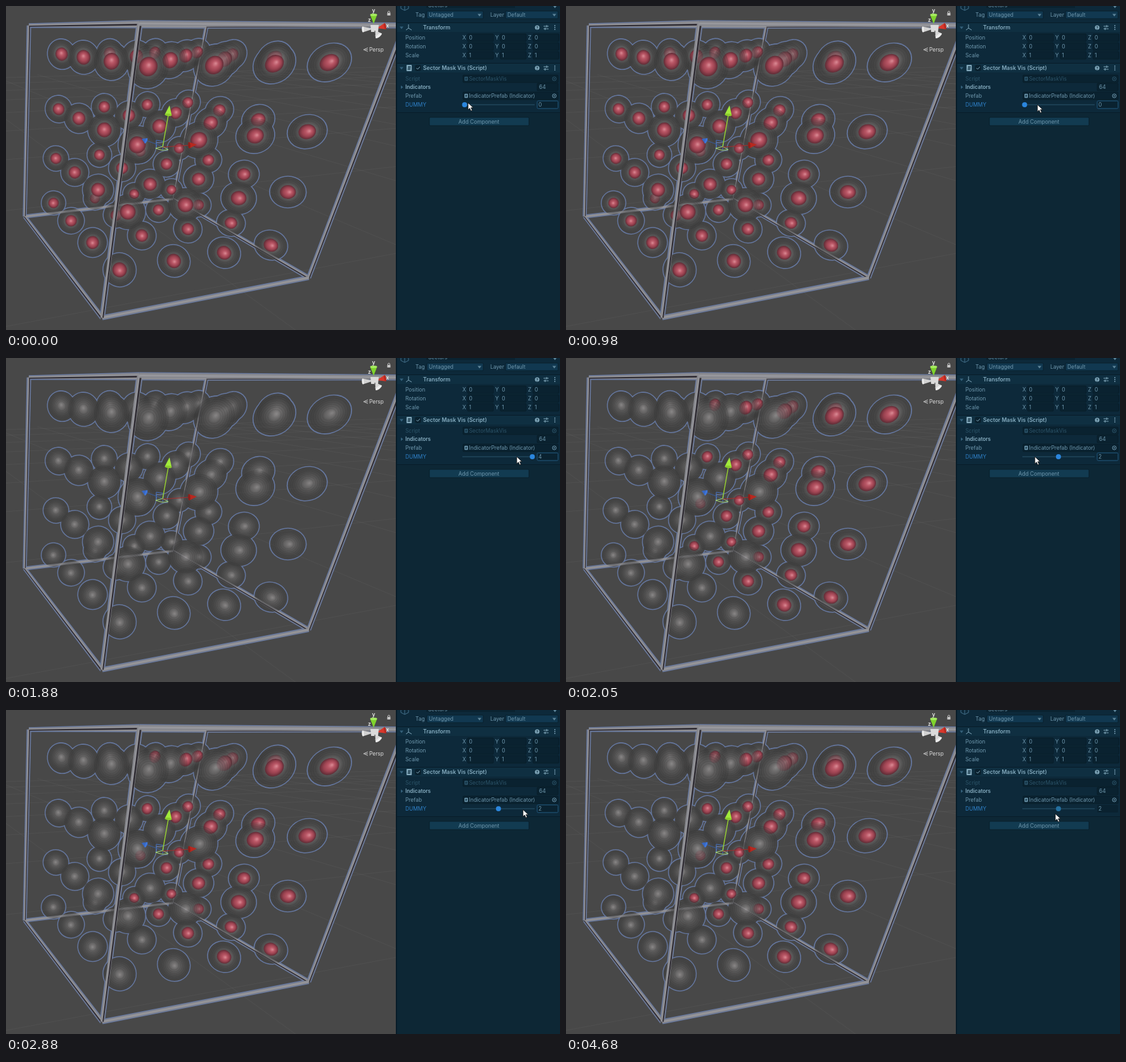
These frames come from a looping animation (874x512 px, 4700 ms). An HTML page with a canvas:

```html
<!DOCTYPE html>
<html lang="en">
<head>
<meta charset="utf-8">
<title>Sector mask</title>
<style>
html, body { margin: 0; width: 100%; height: 100%; overflow: hidden; background: #484848; }
canvas, svg { position: absolute; left: 0; top: 0; display: block; }
text { font: 8.4px Inter, sans-serif; fill: #6f98ae; dominant-baseline: central; }
.bold { font-weight: 600; font-size: 8.6px; fill: #86adc0; }
.dim { fill: #2c5469; }
.blue { fill: #2f80c8; }
.white { fill: #dedede; }
.axis { fill: #e8e8e8; font-weight: 600; }
</style>
</head>
<body>
<canvas id="scene" width="616" height="512"></canvas>
<svg id="ui" width="874" height="512" viewBox="0 0 874 512"></svg>
<script>
const LOOP = 4700;
const scene = document.getElementById('scene');
const ctx = scene.getContext('2d');
const ui = document.getElementById('ui');

// Perspective: grid coordinates (right, down, near) to pixels and depth.
function project(x, y, z) {
  const d = 1 + 0.033 * x + 0.057 * y - 0.108 * z;
  return {
    x: (87.8 + 81.2 * x + 21.33 * z) / d,
    y: (76.1 + 1.47 * x + 96.13 * y - 3.8 * z) / d,
    d
  };
}

// Spheres stretch away from the view axis, and their lit spot moves with them.
const balls = [];
for (let i = 0; i < 64; i++) {
  const col = i >> 4, p = project(col, i >> 2 & 3, i & 3);
  const dx = p.x - 150, dy = p.y - 290, slope = Math.hypot(dx, dy) / 515;
  const stretch = Math.hypot(1, slope);
  balls.push({ ...p, col, r: 21.6 / p.d, angle: Math.atan2(dy, dx), stretch,
    lit: 0.5 * slope / stretch });
}
const farFirst = (a, b) => b.d - a.d;
balls.sort(farFirst);

function disc(c, ball, r, fill) {
  c.save();
  c.translate(ball.x, ball.y);
  c.rotate(ball.angle);
  c.scale(ball.stretch, 1);
  c.beginPath();
  c.arc(0, 0, r, 0, 7);
  c.fillStyle = fill;
  c.fill();
  c.restore();
}

function shade(ball, r, ...colors) {
  const g = ctx.createRadialGradient(r * ball.lit, 0, 0, 0, 0, r);
  colors.forEach((color, i) => g.addColorStop(i / (colors.length - 1), color));
  return g;
}

function drawBall(ball, on) {
  const inner = on ? 0.6 : 0.25;
  for (let k = 1; k > inner; k -= 0.11) {
    const r = ball.r * k;
    disc(ctx, ball, r, shade(ball, r, 'rgba(158,155,155,.19)', 'rgba(122,120,120,.19)',
      'rgba(98,97,97,.19)', 'rgba(42,42,42,.24)'));
  }
  const core = ball.r * 0.45;
  if (on) disc(ctx, ball, core, shade(ball, core, '#da8a94', '#b95766', '#9a4250', '#5f2c36'));
}

// Cube frame: each bar joins two corners that differ along one axis.
const LOW = [-0.5, -0.48, -0.5], HIGH = [3.5, 3.47, 3.5];
const corner = n => project(...LOW.map((low, i) => n >> i & 1 ? HIGH[i] : low));
const bars = [];
for (let n = 0; n < 8; n++)
  for (let axis = 0; axis < 3; axis++)
    if (!(n >> axis & 1)) {
      const a = corner(n), b = corner(n | 1 << axis);
      bars.push({ a, b, axis, d: (a.d + b.d) / 2 });
    }
bars.sort(farFirst);

function band(c, { a, b }, lo, hi, fill, grow = 0) {
  const len = Math.hypot(b.x - a.x, b.y - a.y);
  const nx = (a.y - b.y) / len, ny = (b.x - a.x) / len;
  const at = (p, k) => {
    const off = k / p.d + Math.sign(k) * grow;
    return [p.x + nx * off, p.y + ny * off];
  };
  polygon(c, [at(a, lo), at(a, hi), at(b, hi), at(b, lo)], fill);
}

function drawBar(bar) {
  band(ctx, bar, -2.3, 2.3, '#87888e');
  band(ctx, bar, -0.8, 0.8, '#98989d');
  const side = [0, -1, 1][bar.axis];
  if (side) band(ctx, bar, side * 0.3, side * 1.9, '#302d34');
}

function polygon(c, points, fill) {
  c.beginPath();
  points.forEach(p => c.lineTo(...p));
  c.closePath();
  c.fillStyle = fill;
  c.fill();
}

function stroke(points, color, width = 1) {
  ctx.beginPath();
  points.forEach(p => ctx.lineTo(...p));
  ctx.strokeStyle = color;
  ctx.lineWidth = width;
  ctx.stroke();
}

function cone(tx, ty, bx, by, w, color, cap = color) {
  const angle = Math.atan2(by - ty, bx - tx);
  const nx = -Math.sin(angle) * w, ny = Math.cos(angle) * w;
  polygon(ctx, [[tx, ty], [bx + nx, by + ny], [bx - nx, by - ny]], color);
  ctx.beginPath();
  ctx.ellipse(bx, by, w * 0.35, w, angle, 0, 7);
  ctx.fillStyle = cap;
  ctx.fill();
}

function floorLine(from, to) {
  const near = 0.12;
  const a = project(...from);
  let b = project(...to);
  if (a.d < near) return;
  if (b.d < near) {
    const t = (a.d - near) / (a.d - b.d);
    b = project(...from.map((v, i) => v + (to[i] - v) * t));
  }
  stroke([[a.x, a.y], [b.x, b.y]], 'rgba(150,150,150,.13)', 0.8);
}

// Selection outline around the union of bars and spheres.
const rim = document.createElement('canvas');
rim.width = scene.width;
rim.height = scene.height;
{
  const c = rim.getContext('2d'), color = '#65779f';
  bars.forEach(bar => band(c, bar, -2.3, 2.3, color, 1.3));
  balls.forEach(ball => disc(c, ball, ball.r + 1.5, color));
  c.globalCompositeOperation = 'destination-out';
  balls.forEach(ball => disc(c, ball, ball.r, '#000'));
}

function drawHandles() {
  stroke([[237, 225], [237, 212], [249, 214], [247, 228]], '#4470bd');
  stroke([[247, 228], [236, 225], [247, 222], [256, 227], [247, 228]], '#a3d776');
  stroke([[220, 212], [247, 222]], '#345a9c');
  stroke([[247, 223], [256, 173]], '#9ad62f', 1.4);
  stroke([[247, 223], [290, 220]], '#a52c2b', 1.2);
  cone(258, 157, 256, 172, 5.5, '#a2ea3c', '#8acb2c');
  cone(301, 219, 289, 220, 5, '#b8281f', '#8d1f1a');
  cone(214, 210, 221, 213, 4.5, '#3768c4', '#3f77dc');
}

function drawCompass() {
  cone(580, 28, 580, 14, 5.5, '#7fd32d', '#a7ec62');
  cone(585, 35, 598, 32, 5, '#d8372b', '#b82a22');
  cone(580, 36, 563, 37, 4.5, '#d2d2d2', '#eee');
  cone(581, 38, 588, 47, 6, '#d6d6d6', '#eee');
  polygon(ctx, [[575, 30], [588, 30], [587, 41], [576, 41]], '#dadada');
  stroke([[582, 39], [582, 46]], '#333');
}

function drawScene(value) {
  ctx.fillStyle = '#484848';
  ctx.fillRect(0, 0, scene.width, scene.height);
  for (let k = -6; k <= 8; k++) {
    const at = 1.5 + 2.1 * k;
    floorLine([45, 1.5, at], [-16, 1.5, at]);
    floorLine([at, 1.5, -12], [at, 1.5, 14]);
  }
  ctx.drawImage(rim, 0, 0);
  const isBack = bar => bar.d > 1.05;
  bars.filter(isBack).forEach(drawBar);
  balls.forEach(ball => drawBall(ball, ball.col >= value));
  bars.filter(bar => !isBack(bar)).forEach(drawBar);
  drawHandles();
  drawCompass();
}

// Inspector panel
const INK = '#7fa5b8', FIELD = '#0a2230', LINE = '#081c28', HEAD = '#0f2f41';
let svg = '';
const add = s => { svg += s; };
const box = (x, y, w, h, fill, extra = '') =>
  add(`<rect x="${x}" y="${y}" width="${w}" height="${h}" fill="${fill}" ${extra}/>`);
const path = (d, color, fill = 'none') =>
  add(`<path d="${d}" stroke="${color}" fill="${fill}"/>`);
const circle = (x, y, r, fill, extra = '') =>
  add(`<circle cx="${x}" cy="${y}" r="${r}" fill="${fill}" ${extra}/>`);
const label = (x, y, s, cls = '', extra = '') =>
  add(`<text x="${x}" y="${y}" class="${cls}" ${extra}>${s}</text>`);
const glyph = (x, y, s, size, fill) =>
  label(x, y, s, '', `text-anchor="middle" style="font-size:${size}px;font-weight:700;fill:${fill}"`);
const field = (x, y, w, fill = FIELD) =>
  box(x, y - 6, w, 12, fill, `rx="1.5" stroke="${LINE}" stroke-width=".8"`);
const arrow = (x, y, color = '#5d8499') => path(`M${x - 3} ${y - 1.5}h6l-3 4z`, 'none', color);

function dropdown(x, y, w, s) {
  field(x, y, w, '#113850');
  label(x + 3, y, s);
  arrow(x + w - 6, y);
}

function script(x, y, h, color) {
  box(x - h / 2.4, y - h / 2, h / 1.2, h, color, 'rx="1"');
  glyph(x, y + 0.3, '#', h * 0.8, HEAD);
}

function objectField(y, s, cls, color) {
  field(721, y, 150);
  script(726, y, 6.5, color);
  label(730.5, y, s, cls);
  circle(865, y, 3, 'none', `stroke="${color}"`);
  circle(865, y, 1.1, color);
}

function header(y, title) {
  box(617, y - 8, 257, 15, HEAD);
  box(617, y - 8, 257, 1, LINE);
  arrow(624, y, '#35607a');
  label(658, y, title, 'bold');
  circle(838, y, 3.6, INK);
  glyph(838, y + 0.2, '?', 6, HEAD);
  path(`M848 ${y - 2}h8M848 ${y + 2}h8M853 ${y - 4}v4M850.5 ${y}v4`, INK);
  for (const k of [-3, 0, 3]) box(865, y + k - 0.8, 1.6, 1.6, INK);
}

box(616, 0, 258, 512, '#0d2735');
box(617, 0, 257, 168, '#0d293a');
box(615, 0, 2, 512, LINE);
path('M623 0v4l6 3l6 -3v-4M629 7v-7', '#44708a');
box(663, -6, 140, 9, FIELD);
label(666, -1, 'Sectors');
arrow(866, 1);
label(646, 14, 'Tag');
dropdown(664, 14, 89, 'Untagged');
label(764, 14, 'Layer');
dropdown(788, 14, 83, 'Default');

header(34, 'Transform');
path('M635 29v6l-4 3M635 35l5 3', INK);
['Position', 'Rotation', 'Scale'].forEach((name, row) => {
  const y = 50 + 14 * row;
  label(630, y, name);
  ['X', 'Y', 'Z'].forEach((axis, i) => {
    const x = 728 + 51.7 * i;
    label(x - 8, y, axis);
    field(x, y, 41);
    label(x + 2.5, y, row === 2 ? 1 : 0);
  });
});

header(98, 'Sector Mask Vis (Script)');
script(636, 98, 10, INK);
box(646, 94, 8, 8, FIELD, `rx="1" stroke="${LINE}"`);
path('M647.5 98l2 2l3.5 -4', INK);
label(630, 115, 'Script', 'dim');
objectField(115, 'SectorMaskVis', 'dim', '#2c5469');
path('M623 125.5l3.5 2.8l-3.5 2.8z', 'none', '#35607a');
label(630, 128, 'Indicators', 'bold', 'style="font-size:8.3px"');
field(838, 128, 33);
label(841, 128, '64');
label(630, 142, 'Prefab');
objectField(142, 'IndicatorPrefab (Indicator)', '', '#6f98ae');
label(630, 156, 'DUMMY', 'blue');
box(720, 155.5, 114, 1, '#2b556c');
circle(0, 156, 4, 'none', 'id="knob"');
box(838, 150, 33, 12, FIELD, 'id="entry" rx="1.5"');
label(840, 156, '0', '', 'id="value"');
box(617, 168, 257, 1, LINE);
box(668, 176, 157, 13, '#123b51', `rx="1.5" stroke="${LINE}" stroke-width=".8"`);
label(746, 182.5, 'Add Component', '', 'text-anchor="middle"');

label(577.5, 7, 'y', 'axis');
label(571, 22, 'z', 'axis');
label(599.5, 31, 'x', 'axis');
label(573, 69, 'Persp', 'white');
path('M571 66l-7 3l7 3M566 69h5', '#bdbdbd');
box(601.5, 11, 5, 4, '#c5c5c5');
path('M602.5 11v-2q1.5 -2 3 0v2', '#c5c5c5');
add('<path id="cursor" d="M0 0v11l2.6 -2.4l1.9 4.2l2 -.9l-1.9 -4.1h3.6z" fill="#fff" stroke="#111" stroke-width=".8"/>');
ui.innerHTML = svg;

const [knob, entry, valueText, cursor] =
  ['knob', 'entry', 'value', 'cursor'].map(id => document.getElementById(id));

// The pointer drags the slider up and down twice; the value snaps to it a little late.
const ZERO = 723, STEP = 26.7, LAG = 80;
const stops = [[0, 729], [600, ZERO], [750, ZERO], [1350, 786], [1620, 837], [1740, 837],
  [2150, ZERO], [2560, ZERO], [3000, 836], [3300, 836], [3650, 807], [3900, 807], [4200, 772],
  [LOOP, 772]];

function ease(t, from, to) {
  const k = Math.min(1, Math.max(0, (t - from) / (to - from)));
  return k * k * (3 - 2 * k);
}

function pointerX(t) {
  return stops.reduce((x, [time, next], i) =>
    i ? x + (next - stops[i - 1][1]) * ease(t, stops[i - 1][0], time) : next, 0);
}

let shown = -1;
function render(t) {
  const dragged = (pointerX(Math.max(0, t - LAG)) - ZERO) / STEP;
  const value = Math.min(4, Math.round(dragged));
  if (value !== shown) {
    shown = value;
    drawScene(value);
    valueText.textContent = value;
    knob.setAttribute('cx', ZERO + 0.5 + STEP * value);
  }
  const active = t < 4500;
  knob.setAttribute('fill', active ? '#2b86dd' : '#236f9f');
  entry.setAttribute('stroke', active ? '#235a80' : 'none');
  const y = 153 + 3 * ease(t, 0, 900) + 8 * ease(t, 2550, 3800);
  cursor.setAttribute('transform', `translate(${pointerX(t)} ${y})`);
}

const start = performance.now();
function tick() {
  render((performance.now() - start) % LOOP);
  requestAnimationFrame(tick);
}
tick();
</script>
</body>
</html>
```
